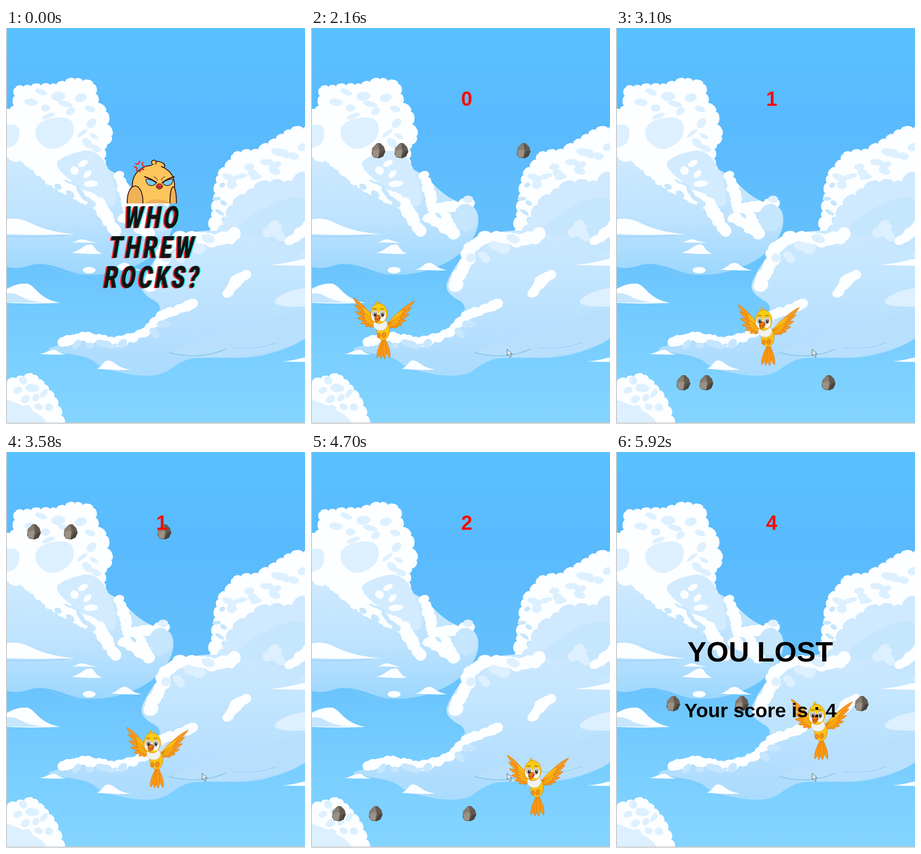
Recreate the animation shown at these times as an HTML page with a canvas. Size 651 by 860 pixels, loop 8 s.

```html
<!DOCTYPE html>
<html lang="en">
<head>
<meta charset="utf-8">
<title>Who threw rocks?</title>
<style>
  html, body { margin: 0; width: 100%; height: 100%; overflow: hidden; background: #5abfff; }
  canvas { display: block; width: 651px; height: 860px; }
</style>
</head>
<body>
<canvas id="stage" width="651" height="860"></canvas>
<script>
const W = 651, H = 860, LOOP = 8000;
const START = 1760, LOST = 5920, TICK = 200 / 3;
const SANS = '"Liberation Sans", Arial, sans-serif';
const stage = document.getElementById('stage').getContext('2d');
let g = stage;

// ---- helpers ----
let seed = 7;
const rnd = () => (seed = seed * 16807 % 2147483647) / 2147483647;
const spread = r => (rnd() - .5) * 2 * r;
const mix = (a, b, p) => a + (b - a) * p;
const pairs = a => a.reduce((out, v, i) => (i % 2 ? out[out.length - 1].push(v) : out.push([v]), out), []);

function paint(fill, line, width = 1) {
  if (fill) { g.fillStyle = fill; g.fill(); }
  if (line) { g.strokeStyle = line; g.lineWidth = width; g.stroke(); }
}

function oval(fill, x, y, rx, ry, turn = 0, line, width) {
  g.beginPath();
  g.ellipse(x, y, rx, ry, turn, 0, 7);
  paint(fill, line, width);
}

function poly(fill, ...xy) {
  g.beginPath();
  pairs(xy).forEach(q => g.lineTo(...q));
  g.closePath();
  paint(fill);
}

// Closed smooth curve through the midpoints of the sides
function soft(fill, line, ...xy) {
  const p = pairs(xy), n = p.length;
  const mid = (a, b) => [(a[0] + b[0]) / 2, (a[1] + b[1]) / 2];
  g.beginPath();
  g.moveTo(...mid(p[n - 1], p[0]));
  p.forEach((q, i) => g.quadraticCurveTo(...q, ...mid(q, p[(i + 1) % n])));
  paint(fill, line, 1.5);
}

function curve(line, width, x0, y0, cx, cy, x1, y1) {
  g.beginPath();
  g.moveTo(x0, y0);
  g.quadraticCurveTo(cx, cy, x1, y1);
  paint(null, line, width);
}

function ramp(y0, y1, ...colors) {
  const r = g.createLinearGradient(0, y0, 0, y1);
  colors.forEach((c, i) => r.addColorStop(i / (colors.length - 1), c));
  return r;
}

function sprite(w, h, draw) {
  const c = document.createElement('canvas');
  c.width = w;
  c.height = h;
  g = c.getContext('2d');
  g.lineJoin = g.lineCap = 'round';
  draw();
  g = stage;
  return c;
}

// ---- clouds ----
const WHITE = '#fcfeff', PALE = '#ddf0ff', SHADE = '#c6e6fe', LINE = '#88caf2';

// Polygon (clockwise) whose sides break up into uneven round bumps
function puff(fill, size, ...xy) {
  const keys = pairs(xy), edge = [];
  keys.forEach(([x, y], i) => {
    const [u, v] = keys[(i + 1) % keys.length];
    const n = Math.max(1, Math.round(Math.hypot(u - x, v - y) / size));
    for (let j = 0; j < n; j++) {
      const p = (j + (j && spread(.25))) / n;
      edge.push([mix(x, u, p), mix(y, v, p)]);
    }
  });
  g.beginPath();
  g.moveTo(...edge[0]);
  edge.forEach(([x, y], i) => {
    const [u, v] = edge[(i + 1) % edge.length];
    const nx = (v - y) * .4, ny = (x - u) * .4;
    g.bezierCurveTo(x + nx, y + ny, u + nx, v + ny, u, v);
  });
  paint(fill);
}

// String of overlapping balls along a line
function chain(fill, r, ...xy) {
  const keys = pairs(xy);
  keys.slice(1).forEach(([u, v], i) => {
    const [x, y] = keys[i], n = Math.ceil(Math.hypot(u - x, v - y) / r);
    for (let j = 0; j <= n; j++) {
      oval(fill, mix(x, u, j / n) + spread(r / 5), mix(y, v, j / n) + spread(r / 5),
        r * mix(.8, 1.15, rnd()), r * mix(.7, 1, rnd()), -.4);
    }
  });
}

// Loose soft marks inside an ellipse
function dapple(fill, n, size, x, y, rx, ry, tilt = 0) {
  for (let i = 0; i < n; i++) {
    const a = i * 2.4, d = Math.sqrt((i + .5) / n), dx = Math.cos(a) * d * rx;
    oval(fill, x + dx, y + Math.sin(a) * d * ry + dx * tilt,
      size * mix(.7, 1.3, rnd()), size * mix(.4, .8, rnd()), spread(.9));
  }
}

// Flat-bottomed streak with pointed ends
function wisp(x0, x1, y, h, peak, fill = WHITE) {
  g.beginPath();
  g.moveTo(x0, y - h * .1);
  g.bezierCurveTo(mix(x0, peak, .5), y - h * .3, mix(x0, peak, .6), y - h, peak, y - h);
  g.bezierCurveTo(mix(peak, x1, .3), y - h, mix(peak, x1, .3), y - h * .25, x1, y);
  g.quadraticCurveTo((x0 + x1) / 2, y + h * .1, x0, y - h * .1);
  paint(fill);
}

function rightCloud() {
  puff(WHITE, 21, 470, 470, 446, 435, 455, 375, 463, 320, 492, 287, 495, 274, 550, 266, 588, 242,
    620, 222, 670, 218, 670, 530, 470, 530);
  dapple(PALE, 14, 13, 560, 302, 90, 22, -.45);
  dapple(SHADE, 5, 9, 470, 380, 12, 55);
  puff('#cfe9ff', 26, 462, 450, 495, 385, 540, 350, 575, 337, 625, 337, 670, 300, 670, 540, 470, 540);
  soft(SHADE, null, 500, 420, 670, 340, 670, 510, 500, 490);
  chain(WHITE, 14, 617, 463, 660, 430);
  dapple(PALE, 4, 14, 580, 440, 24, 12);
  wisp(545, 606, 499, 18, 575);
}

function leftCloud() {
  soft(ramp(290, 535, '#cce9ff', '#bfe3fe', '#9dd7fe'), null,
    -30, 250, 60, 260, 230, 300, 300, 375, 365, 385, 364, 450, 300, 515, 180, 545, 80, 506, 20, 526, -30, 508);
  puff(WHITE, 19, -10, 190, 21, 170, 21, 130, 110, 124, 150, 112, 190, 122, 197, 165, 217, 182, 217, 210,
    229, 235, 212, 263, 212, 303, 150, 330, 90, 318, 50, 290, -10, 275);
  dapple(PALE, 9, 13, 110, 165, 80, 32);
  soft(PALE, null, 70, 200, 145, 190, 150, 240, 100, 270, 60, 240);
  soft(PALE, null, -20, 215, 30, 205, 28, 255, -20, 265);
  dapple(PALE, 5, 11, 185, 235, 20, 40);
  soft('#d2ebff', null, 130, 275, 200, 260, 240, 340, 240, 400, 180, 360, 100, 300);
  dapple(WHITE, 4, 14, 165, 310, 35, 22, .6);
  chain(WHITE, 14, 50, 290, 110, 338, 200, 380, 236, 442);
  chain(WHITE, 13, 248, 322, 254, 350, 268, 393, 344, 383);
  chain(WHITE, 13, 255, 410, 310, 445, 290, 400);
  dapple(SHADE, 5, 12, 160, 365, 50, 12, .4);
  oval(SHADE, 336, 412, 25, 30);
  oval(PALE, 342, 372, 11, 8);
  wisp(-60, 152, 448, 34, 15);
  curve(LINE, 1, 0, 453, 70, 455, 130, 450);
  wisp(142, 210, 490, 20, 185);
  wisp(144, 200, 466, 7, 165);
  oval(WHITE, 181, 526, 14, 7);
  wisp(228, 297, 526, 16, 258);
  curve(LINE, 1.2, 85, 512, 130, 545, 225, 533);
}

function middleCloud() {
  soft(ramp(440, 750, '#cbe9ff', '#c3e5fe', '#b8e0fe', '#aadbfe'), null,
    294, 545, 370, 440, 530, 440, 690, 510, 690, 660, 560, 718, 430, 715, 385, 720, 330, 762, 210, 742,
    180, 712, 66, 699, 170, 678, 280, 682, 350, 606, 296, 578);
  soft('#b8e0fd', null, 350, 695, 540, 650, 690, 590, 690, 660, 560, 714, 380, 716);
  chain(WHITE, 15, 314, 560, 320, 535, 343, 500, 345, 478, 378, 455, 420, 457, 450, 462, 500, 449);
  dapple(PALE, 7, 14, 395, 482, 60, 14, -.4);
  chain(WHITE, 13, 482, 574, 500, 550, 524, 537);
  wisp(573, 700, 516, 17, 680);
  soft(PALE, null, 570, 604, 610, 570, 690, 560, 690, 606);
  chain(WHITE, 12, 124, 681, 165, 670, 245, 682, 300, 662, 338, 627, 406, 597);
  dapple(SHADE, 6, 11, 205, 688, 60, 5);
  dapple(SHADE, 4, 11, 335, 650, 25, 7, -.8);
  wisp(198, 272, 742, 20, 222);
  wisp(72, 132, 709, 10, 105);
  curve(LINE, 2, 356, 705, 425, 722, 478, 697);
  curve(LINE, 1, 496, 694, 545, 700, 588, 684);
}

function smallClouds() {
  wisp(-60, 118, 597, 42, 42);
  wisp(-60, 80, 596, 20, 10, SHADE);
  wisp(602, 700, 725, 11, 670);
  puff(WHITE, 20, -10, 774, 22, 762, 60, 754, 83, 775, 104, 802, 119, 842, 122, 870, -10, 870);
  dapple(PALE, 9, 12, 55, 800, 42, 36, .3);
  soft(PALE, null, -20, 800, 40, 820, 90, 850, 90, 880, -20, 880);
}

const scenery = sprite(W, H, () => {
  g.fillStyle = ramp(0, H, '#5ac1ff', '#59bafd', '#63bffc', '#76ccff', '#84d5ff');
  g.fillRect(0, 0, W, H);
  rightCloud();
  leftCloud();
  middleCloud();
  smallClouds();
});

// ---- characters ----
const chick = sprite(112, 97, () => {
  const ink = '#3b1712';
  g.translate(-262, -284);
  oval('#fdc65c', 332, 297, 14, 7, .2, ink, 2);
  oval('#fdc65c', 322, 292, 5, 5, 0, ink, 2);
  g.beginPath();
  g.moveTo(275, 390);
  g.lineTo(275, 340);
  g.bezierCurveTo(278, 284, 364, 284, 367, 340);
  g.lineTo(367, 390);
  paint('#fdc65c', ink, 2);
  oval('#fdc65c', 327, 300, 11, 4);
  oval('#eeb057', 330, 384, 27, 12);
  oval('#f0b259', 281, 376, 17, 33, 0, ink, 2);
  oval('#f0b259', 364, 376, 7, 31, 0, ink, 2);
  for (const s of [-1, 1]) {
    const at = d => 334 + s * d;
    soft('#76cdf2', ink, at(32), 325, at(5), 335, at(13), 343, at(26), 341);
    curve(ink, 2.5, at(32), 323, at(18), 327, at(6), 336);
    curve(ink, 1.2, at(12), 323, at(5), 326, at(4), 331);
  }
  oval('#d93832', 334, 344, 7, 6, 0, ink);
  curve(ink, 1, 328, 345, 334, 347, 341, 344);
  for (let i = 0; i < 4; i++) {
    g.save();
    g.translate(291, 301);
    g.rotate(i * Math.PI / 2 + .25);
    curve('#e7342e', 3.2, 4, -10, 3, -3, 11, -3);
    g.restore();
  }
});

function feather(x, y, deg, len, w, fill) {
  g.save();
  g.translate(x, y);
  g.rotate(deg * Math.PI / 180);
  g.beginPath();
  g.moveTo(0, 0);
  g.quadraticCurveTo(len * .72, w, len, 0);
  g.quadraticCurveTo(len * .72, -w, 0, 0);
  paint(fill, '#d9720e', .8);
  g.restore();
}

// Fan of feathers from the long top one to the short inner one
function wing(x, y, deg0, deg1, len0, len1) {
  for (const [scale, fill] of [[1, '#f99a1c'], [.62, '#fdbb14']]) {
    for (let i = 6; i >= 0; i--) {
      const p = i / 6;
      feather(x, y, mix(deg0, deg1, p ** 1.4), mix(len0, len1, p ** .8) * scale, 8, fill);
    }
  }
}

const bird = sprite(140, 140, () => {
  const edge = '#d9820e';
  g.translate(1, 1);
  wing(48, 50, 226, 128, 69, 18);
  wing(75, 56, -40, 39, 77, 14);
  for (const deg of [108, 75, 98, 88]) feather(67, 84, deg, 49, 8, '#fa9a14');
  oval('#fcc112', 65, 70, 14, 22, 0, edge);
  oval('#f1f3f1', 59, 58, 15, 13, 0, '#c9cfcd');
  feather(50, 22, -80, 16, 6, '#fdcb12');
  oval('#fdcb12', 56, 34, 18, 22, 0, edge);
  for (const x of [47, 63]) {
    oval('#f7f8f5', x, 39, 8, 12);
    oval('#fff', x, 35, 4.5, 7, 0, '#555');
    oval('#2b2724', x + .6, 36, 2.8, 4.6);
    oval('#fff', x + 1.2, 34, 1, 1.4);
    curve('#3a3028', 1, x - 4, 25, x, 22, x + 4, 25);
  }
  soft('#f47a14', '#a94c0a', 45, 44, 54, 36, 61, 43, 51, 55);
  curve('#8d2d10', 1.2, 49, 46, 54, 48, 58, 43);
  oval('#f5901a', 56, 82, 4, 5, .3, '#c96a0a');
  oval('#f5901a', 67, 81, 4, 6, .2, '#c96a0a');
});

const rock = sprite(32, 36, () => {
  poly('#625a51', 13, 1, 20, 1, 28, 9, 31, 19, 26, 30, 17, 34, 5, 32, 1, 25, 2, 12);
  poly('#877d72', 15, 1, 2, 12, 2, 19, 12, 14, 18, 17);
  poly('#9c9185', 12, 14, 18, 17, 15, 32, 4, 31, 2, 19);
  poly('#4b443e', 17, 30, 24, 18, 31, 19, 26, 30, 17, 34);
});

const pointer = sprite(16, 22, () => {
  poly('#dcebf4', 1, 1, 1, 15, 4, 12, 7, 18, 10, 17, 7, 11, 12, 11);
  paint(null, '#4c5864', 1);
});

// ---- text ----
function label(text, x, y, size, color) {
  g.font = `bold ${size}px ${SANS}`;
  g.textAlign = 'center';
  g.fillStyle = color;
  g.fillText(text, x, y);
}

// Slanted narrow lettering with red and cyan fringes
function glitch(text, x, y, size) {
  g.font = `900 ${size}px Roboto, ${SANS}`;
  g.textAlign = 'center';
  g.letterSpacing = size * .14 + 'px';
  for (const [color, dx, dy] of [['#f0242c', -3, 1], ['#2fe3e6', 2.5, -.5], ['#121414', 0, 0]]) {
    g.save();
    g.transform(.7, 0, -.17, 1, x + dx, y + dy);
    g.fillStyle = color;
    g.fillText(text, 0, 0);
    g.restore();
  }
  g.letterSpacing = '0px';
}

// ---- motion ----
const WAVE = 24, FALL = 36; // ticks per wave, pixels per tick
const waves = [
  { y: 33, xs: [131, 181, 447] },
  { y: 48, xs: [45, 125, 329] },
  { y: 25, xs: [109, 258, 519] }
];
// Turning points of the flight: tick, x, y
const flight = [[0, 245, 586], [6, 92, 586], [14, 268, 603], [33, 260, 595], [44, 427, 658], [50, 345, 640], [62, 381, 536]];
const blinks = [[190, 330], [530, 860], [1060, 1390], [1590, START]];

const ticks = (t, from) => Math.floor((t - from + 8) / TICK);

function birdAt(n) {
  const i = flight.findIndex(k => k[0] >= n) || 1;
  const [a, x0, y0] = flight[i - 1], [b, x1, y1] = flight[i];
  const p = (n - a) / (b - a);
  return [mix(x0, x1, p), mix(y0, y1, p)];
}

function intro(t) {
  g.drawImage(chick, 262, 284);
  const title = ['WHO', 'THREW', 'ROCKS?'];
  title.forEach((line, i) => glitch(line, 317, 434 + i * 65, 66));
  if (blinks.some(([a, b]) => t >= a && t < b)) {
    glitch('PRESS', 311, 717, 50);
    glitch('START', 311, 769, 50);
  }
}

function game(t) {
  const n = ticks(t, START), wave = waves[Math.floor(n / WAVE)];
  wave.xs.forEach(x => g.drawImage(rock, x, wave.y + n % WAVE * FALL));
  const [x, y] = birdAt(n);
  g.drawImage(bird, x - 1, y - 1);
  const score = Math.floor((t - START) / 1000);
  label(score, 339, 169, 44, '#ff0a00');
  if (t === LOST) {
    label('YOU LOST', 314, 455, 62, '#000');
    label('Your score is : ' + score, 314.5, 576, 43, '#000');
  }
}

function cursor(t) {
  if (t < 530) return;
  const p = Math.min(1, ticks(t, 530) / 4), e = p * (2 - p);
  g.drawImage(pointer, mix(533, 426, e), mix(829, 697, e));
}

function render(now) {
  const t = now % LOOP;
  g.drawImage(scenery, 0, 0);
  if (t < START) intro(t);
  else game(Math.min(t, LOST));
  cursor(t);
  g.fillStyle = '#c9cbcd';
  g.fillRect(0, 0, 2, H);
  g.fillRect(0, 857, W, 2);
  g.fillStyle = '#eceeef';
  g.fillRect(0, 859, W, 1);
}

const t0 = performance.now();
function loop() {
  render(performance.now() - t0);
  requestAnimationFrame(loop);
}
loop();
</script>
</body>
</html>
```
